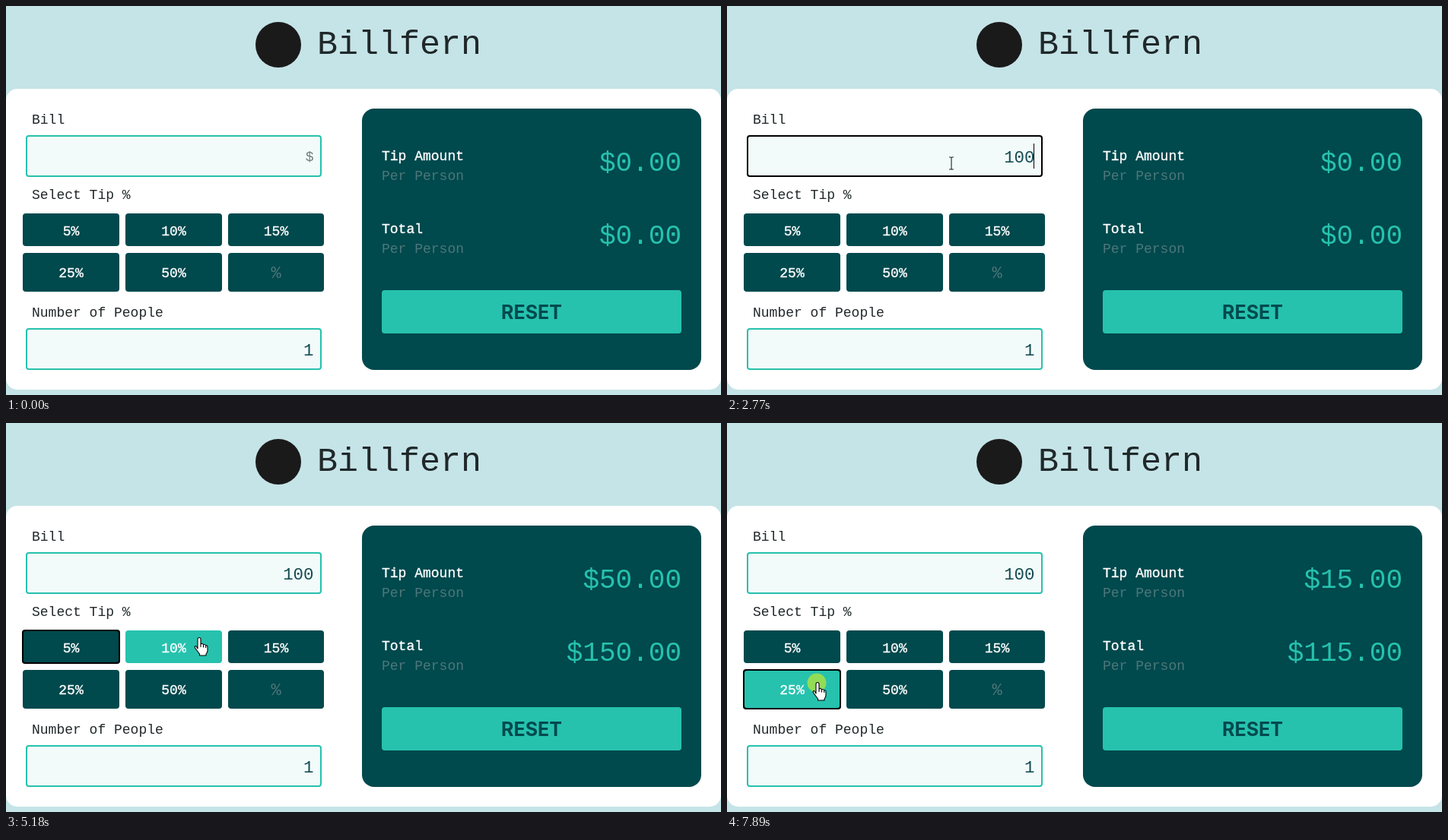
Animation, 940 px wide and 512 px high, one loop 8000 ms. Source, as an HTML page:

```html
<!DOCTYPE html>
<html lang="en">
<head>
<meta charset="utf-8">
<title>Tip calculator</title>
<style>
html, body { margin: 0; width: 100%; height: 100%; overflow: hidden; background: #c5e4e7; }
svg { display: block; width: 100%; height: 100%; }
text { font-family: "Liberation Mono", "Noto Sans Mono", monospace; font-size: 18px; fill: #20282a; }
.title { font-size: 45px; }
.strong { fill: #fff; stroke: #fff; stroke-width: .35px; }
.muted { fill: #4c777a; }
.value { font-size: 36px; fill: #26c2ae; text-anchor: end; }
.entry { font-size: 22.4px; fill: #124c51; text-anchor: end; }
.hint { font-size: 18px; fill: #6c7d7c; }
.middle { text-anchor: middle; }
.reset { font: 700 25px Inter, sans-serif; fill: #00494d; text-anchor: middle; }
</style>
</head>
<body>
<svg id="stage" viewBox="0 0 940 512"></svg>
<script>
const LOOP = 8000, DARK = '#00494d', TEAL = '#26c2ae';
const stage = document.getElementById('stage');

function add(tag, attrs, content) {
  const el = document.createElementNS('http://www.w3.org/2000/svg', tag);
  set(el, attrs);
  if (content) el.textContent = content;
  stage.append(el);
  return el;
}
function set(el, attrs) {
  for (const key in attrs) el.setAttribute(key, attrs[key]);
}
const box = (x, y, width, height, rx, fill) => add('rect', { x, y, width, height, rx, fill });
const label = (x, y, cls, content) => add('text', { x, y, class: cls }, content);
const show = (el, on) => el.setAttribute('visibility', on ? 'visible' : 'hidden');

function field(y) {
  const el = box(27, y + 1, 387, 53, 3, '#f3fafa');
  set(el, { stroke: TEAL, 'stroke-width': 2 });
  return el;
}

box(0, 0, 940, 512, 0, '#c5e4e7');
add('circle', { cx: 358, cy: 51, r: 30, fill: '#1b1a1b' });
label(409, 63, 'title', 'Billfern');
box(0, 109, 940, 396, 15, '#fff');

label(34, 155, '', 'Bill');
const bill = field(170);
label(34, 254, '', 'Select Tip %');
label(34, 409, '', 'Number of People');
field(424);
label(404.5, 460, 'entry', '1');
const entry = label(404.5, 206, 'entry');
const caret = box(403, 181, 1, 33, 0, '#000');

const buttons = ['5%', '10%', '15%', '25%', '50%', '%'].map((name, i) => {
  const x = [22, 157, 292][i % 3], w = i % 3 == 2 ? 126 : 127;
  const [y, h] = i < 3 ? [273, 43] : [325, 51];
  const ring = box(x - 1, y - 1, w + 2, h + 2, 4, '#000');
  const face = box(x, y, w, h, 4, DARK);
  const text = label(x + w / 2, i < 3 ? 302 : 357, i < 5 ? 'strong middle' : 'muted middle', name);
  if (i == 5) set(text, { y: 358, style: 'font-size:22px' });
  const contains = (px, py) => px >= x && px < x + w && py >= y && py < y + h;
  return { x, y, w, h, ring, face, contains };
});

box(468, 135, 446, 344, 16, DARK);
label(494, 203, 'strong', 'Tip Amount');
label(494, 229, 'muted', 'Per Person');
label(494, 299, 'strong', 'Total');
label(494, 325, 'muted', 'Per Person');
const tip = label(888, 217, 'value');
const total = label(888, 313, 'value');
box(494, 374, 394, 57, 4, TEAL);
label(691, 412, 'reset', 'RESET');

const spot = add('circle', { r: 12.5, fill: '#fff500', opacity: .5 });
const outline = { fill: '#fff', stroke: '#000', 'stroke-width': 1.1, 'stroke-linejoin': 'round' };
const pointers = {
  hand: add('path', { ...outline, d: 'M-1 14V1.5a2 2 0 0 1 4 0V8q2-1.5 3.5.8 2-1 3.2 1 2.3-.5 2.3 2v5q0 2-2 4.200v2H1.500v-2L-4.500 13q-1-2.800 1.200-2.500zM3 8v4M6.500 9v3.500M9.700 10v3' }),
  beam: add('path', { d: 'M-2 -8H0Q1-8 1-7Q1-8 2-8H4M1-7V7M-2 8H0Q1 8 1 7Q1 8 2 8H4', fill: 'none', stroke: '#222', 'stroke-width': 1.1 }),
  arrow: add('path', { ...outline, d: 'M0 0V16L3.700 12.500 6.200 18.500 8.800 17.400 6.300 11.600H11.500Z' })
};

const easeIn = p => p * p;
const easeOut = p => 1 - (1 - p) ** 2;
const easeBoth = p => p < .5 ? 4 * p ** 3 : 1 - 4 * (1 - p) ** 3;

// Pointer moves: first step, last step, number of steps, end point, easing
const moves = [
  [390, 1150, 12, 295, 199, easeBoth],
  [1360, 1700, 5, 294, 207, easeBoth],
  [3560, 4240, 10, 113, 292, easeBoth],
  [4900, 5180, 5, 253, 283, easeBoth],
  [6120, 6530, 7, 375, 286, easeBoth],
  [7070, 7280, 4, 301, 301, easeIn],
  [7350, 7620, 5, 118, 342, easeOut]
];

function pointerAt(t) {
  let x = 55, y = 462;
  for (const [from, to, steps, endX, endY, ease] of moves) {
    if (t < from) break;
    const step = Math.floor((t - from) / (to - from) * (steps - 1) + .001) + 1;
    const p = ease(Math.min(1, step / steps));
    x += (endX - x) * p;
    y += (endY - y) * p;
  }
  return [x, y];
}

// Latest value in a list of [start, value]
const at = (track, t) => track.reduce((v, [start, next]) => t >= start ? next : v, track[0][1]);
const within = (spans, t) => spans.some(([a, b]) => t >= a && t < b);

const typed = [[0, '$'], [2170, '1'], [2500, '10'], [2770, '100']];
const focus = [[0, 'none'], [1220, 'bill'], [4310, 0], [5600, 1], [6600, 2], [7820, 3]];
const tips = [[0, 0], [4440, 50], [5720, 10], [6740, 15]];
const presses = [[1220, 1360], [4310, 4440], [5600, 5720], [6600, 6740], [7820, LOOP]];
const blinks = [[1220, 1770], [2170, 3300], [3830, 4310]];
const money = n => '$' + n.toFixed(2);

function draw(t) {
  const [x, y] = pointerAt(t);
  const active = at(focus, t), text = at(typed, t), amount = at(tips, t);

  bill.setAttribute('stroke', active === 'bill' ? '#000' : TEAL);
  entry.textContent = text;
  set(entry, { class: text === '$' ? 'entry hint' : 'entry', y: text === '$' ? 204 : 206 });
  show(caret, within(blinks, t));

  const visible = t >= 390;
  let hovered = false;
  buttons.forEach((b, i) => {
    const over = visible && b.contains(x, y);
    hovered = hovered || over;
    show(b.ring, active === i);
    // The focus outline overlaps the face by one pixel
    const inset = active === i ? 1 : 0;
    set(b.face, {
      fill: over ? TEAL : DARK, rx: 4 - inset,
      x: b.x + inset, y: b.y + inset, width: b.w - 2 * inset, height: b.h - 2 * inset
    });
  });

  tip.textContent = money(amount);
  total.textContent = money(amount ? 100 + amount : 0);

  const inField = x > 26 && x < 415 && (y > 170 && y < 225 || y > 424 && y < 479);
  const kind = hovered ? 'hand' : inField ? 'beam' : 'arrow';
  for (const name in pointers) {
    show(pointers[name], visible && name === kind);
    pointers[name].setAttribute('transform', `translate(${x} ${y})`);
  }
  set(spot, { cx: x, cy: y });
  show(spot, within(presses, t));
}

const start = performance.now();
function tick() {
  draw((performance.now() - start) % LOOP);
  requestAnimationFrame(tick);
}
tick();
</script>
</body>
</html>
```
